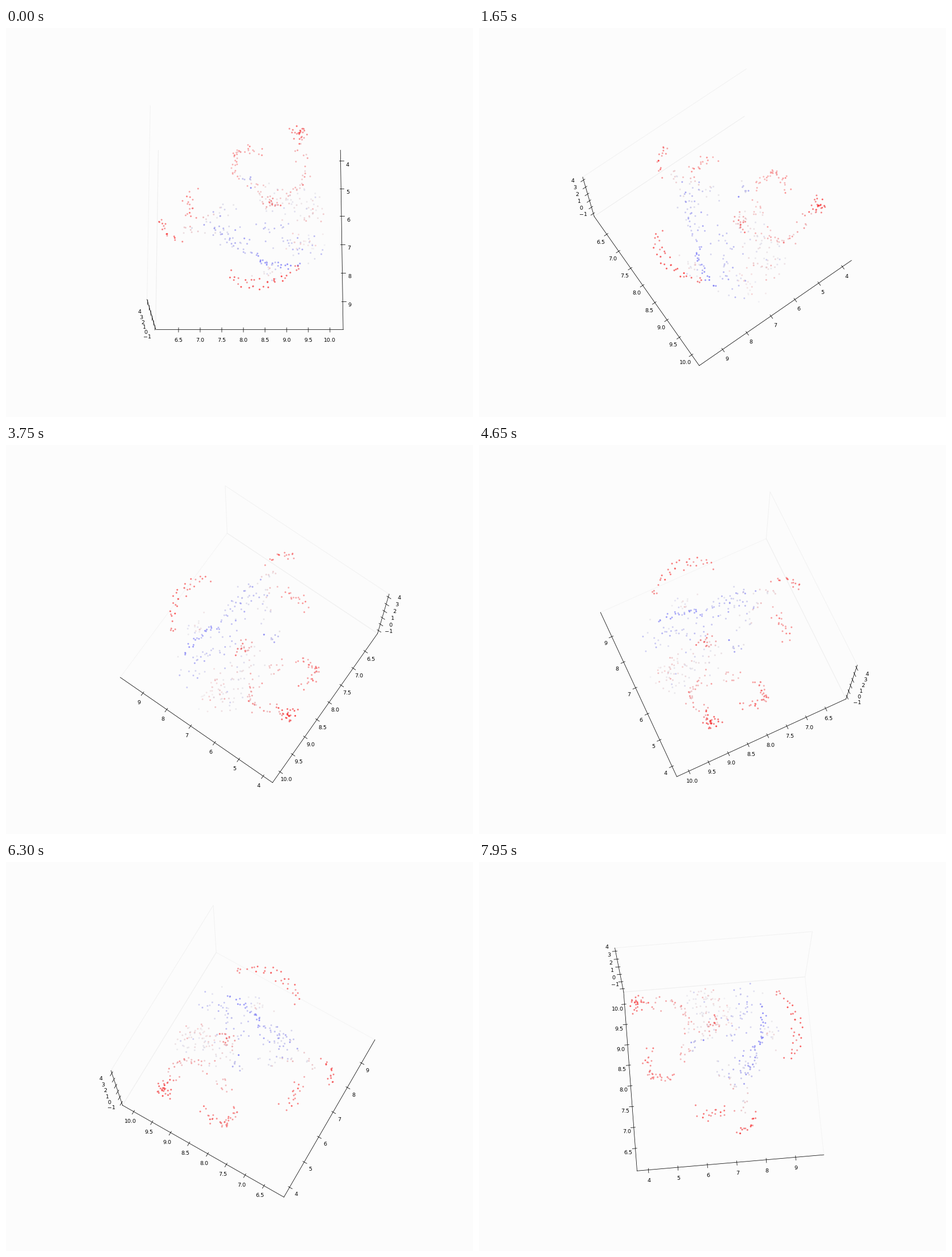
Animation, 820 px wide and 683 px high, one loop 8 s. Source, as a matplotlib script:

```python
import numpy as np
import matplotlib.pyplot as plt
from matplotlib.animation import FuncAnimation
from matplotlib.colors import LinearSegmentedColormap

WIDTH, HEIGHT = 820, 683
DPI = WIDTH / 12
PAPER = "#fcfcfc"
TICK_MS, LOOP_MS, HOLD_MS, STEP_DEG = 50, 8000, 150, 5
RED, ROSE, PALE, LILAC, BLUE = 0.68, 0.4, 0.02, -0.25, -0.65

rng = np.random.default_rng(12)
score_map = LinearSegmentedColormap.from_list("score", ["#0000ff", "#dedce2", "#ff0000"])


def strand(score, count, spread, *controls):
    """Scatter points along a Bezier curve; a single control gives a round blob."""
    t = ((np.arange(count) + rng.random(count)) / count)[:, None]
    curve = [np.array(control, float) for control in controls]
    while len(curve) > 1:
        curve = [a + (b - a) * t for a, b in zip(curve, curve[1:])]
    xyz = curve[0] + rng.normal(0, spread, (count, 3)) * (1, 0.75, 1)
    return np.column_stack([xyz, rng.normal(score, 0.13, count).clip(-1, 1)])


cloud = np.vstack([
    # right tuft, its stalk, and the shelf it stands on
    strand(RED, 26, 0.14, (4.2, 9.23, 2.9)),
    strand(ROSE, 32, 0.12, (4.5, 9.25, 2.7), (5.9, 9.75, 1), (5.85, 8.6, 1)),
    # hook and the patch inside it
    strand(RED, 36, 0.07, (4.5, 8.4, 1.5), (3.9, 7.6, 1.2), (5.25, 7.85, 0.6)),
    strand(ROSE, 10, 0.15, (5.5, 8.3, 1)),
    strand(LILAC, 8, 0.1, (5.9, 8.05, 3.6)),
    strand(ROSE, 18, 0.15, (6.55, 8.6, 3.2)),
    # left arms
    strand(RED, 18, 0.12, (5.8, 6.95, 1.5), (6.3, 6.6, 1.7), (6.8, 6.84, 1.5)),
    strand(RED, 15, 0.06, (7, 6.22, 2.6), (7.35, 6.2, 2.8), (7.72, 6.62, 2.2)),
    strand(PALE, 26, 0.15, (7.45, 6.7, 2.4), (7, 7.2, 3), (6.6, 7.8, 2.6)),
    # blue ridge
    strand(LILAC, 40, 0.16, (7.3, 7.35, 3.4), (7.5, 7.7, 2.4), (7.85, 8.1, 1.3)),
    strand(BLUE, 24, 0.06, (7.93, 8.28, 1), (8.3, 8.6, 1), (8.22, 9.28, 1.2)),
    strand(LILAC, 36, 0.22, (7.1, 8.5, 2.2), (7.7, 9, 1.7), (7.75, 9.75, 1.2)),
    strand(PALE, 16, 0.18, (8.4, 8.6, 1.1)),
    # pale flank
    strand(PALE, 46, 0.25, (6.2, 8.5, 2.3), (6.3, 9.6, 1.2)),
    strand(ROSE / 2, 16, 0.15, (6.25, 9.7, 0.6), (6.7, 9.35, 1.7)),
    strand(ROSE / 2, 20, 0.15, (7.1, 9, -0.7), (7, 9.9, -1)),
    # lower arc
    strand(RED, 32, 0.1, (8.8, 7.75, 2.8), (9.9, 8.3, 3.3), (8.6, 9.27, 3.2)),
])
colors = score_map((cloud[:, 3] + 1) / 2)
colors[:, 3] = 0.65

fig = plt.figure(figsize=((WIDTH + 0.01) / DPI, (HEIGHT + 0.01) / DPI),
                 dpi=DPI, facecolor=PAPER)
ax = fig.add_subplot(projection="3d", facecolor=PAPER)
ax.grid(False)
for axis in (ax.xaxis, ax.yaxis, ax.zaxis):
    axis.pane.fill = False
ax.xaxis.pane.set_edgecolor("none")
ax.scatter(*cloud[:, :3].T, c=colors, s=5)

ax.set_xticks(np.arange(4, 10))
ax.set_yticks(np.arange(6.5, 10.1, 0.5))
ax.set_zticks(np.arange(-1, 5))
ax.set_xlim(3.614, 9.96)
ax.set_ylim(5.97, 10.305)
ax.set_zlim(-1.47, 4.4)


def update(frame):
    ax.view_init(elev=75, azim=STEP_DEG * (frame * TICK_MS // HOLD_MS))
    return []


anim = FuncAnimation(fig, update, frames=LOOP_MS // TICK_MS, interval=TICK_MS,
                     init_func=lambda: update(0), repeat=True, repeat_delay=0)
plt.show()
```
